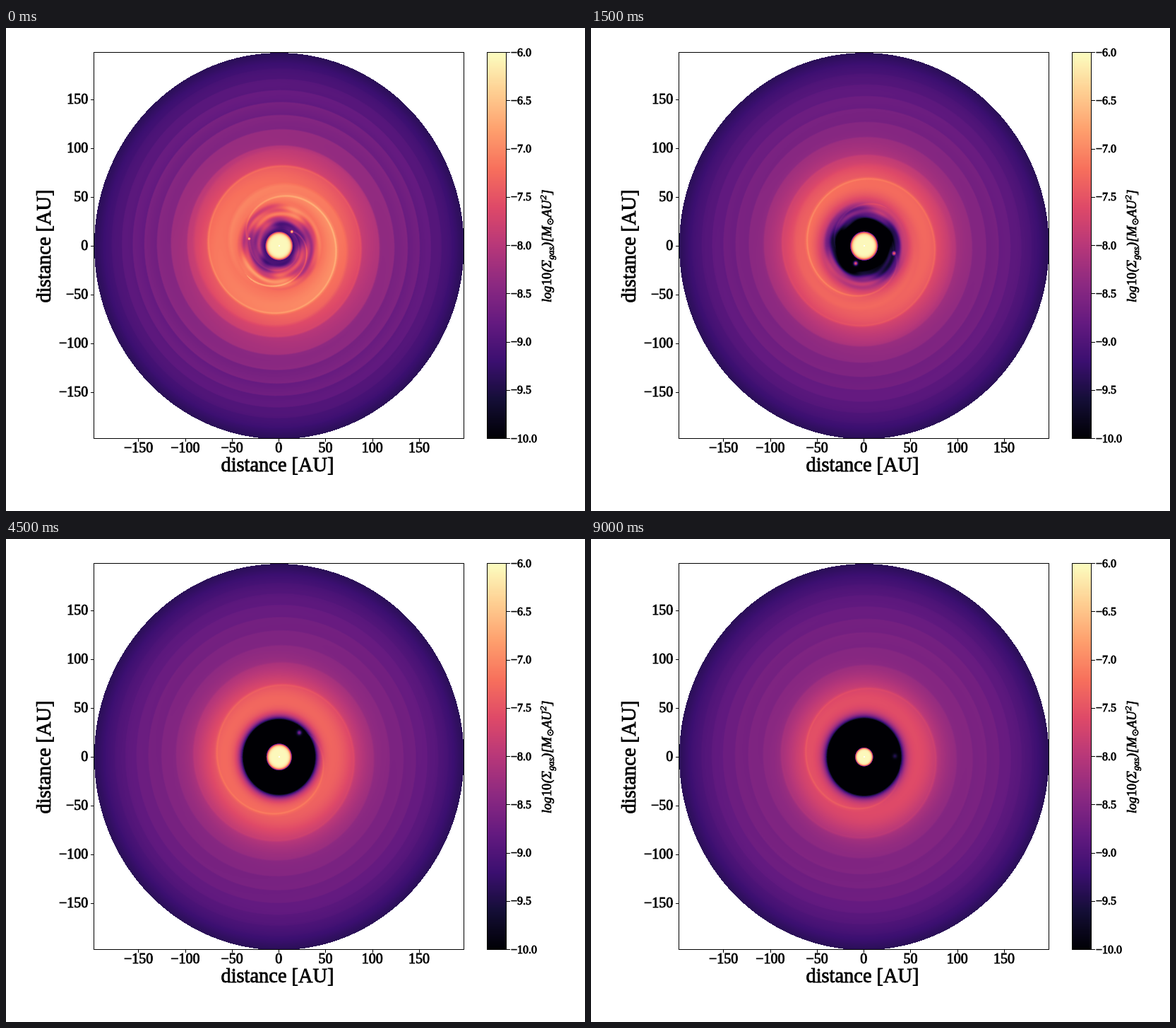
Animation, 820 px wide and 683 px high, one loop 9.5 s. Source, as an HTML page with a canvas:

```html
<!DOCTYPE html>
<html>
<head>
<meta charset="utf-8">
<style>
html, body { margin: 0; width: 100%; height: 100%; overflow: hidden; background: #fff; }
canvas { display: block; }
</style>
</head>
<body>
<canvas id="stage" width="820" height="683"></canvas>
<script>
const ctx = document.getElementById('stage').getContext('2d');
const TAU = Math.PI * 2, STEP = 500, STEPS = 19;
const PLOT = { x: 125, y: 35, w: 523, h: 545, cx: 386.3, cy: 307.7, sx: 1.3225, sy: 1.379 };
const RMAX = 198, RES = 8, ORBIT = 33, INNER = 20;

const { exp, pow, min, max, sin, cos, abs } = Math;
const clamp = (v, a = 0, b = 1) => max(a, min(b, v));
const fract = v => v - Math.floor(v);
const rad = d => d * Math.PI / 180;

// magma colour map
const STOPS = ['000004', '140e36', '3b0f70', '641a80', '8c2981', 'b73779',
  'de4968', 'f7705c', 'fe9f6d', 'fecf92', 'fcfdbf']
  .map(s => [0, 2, 4].map(i => parseInt(s.substr(i, 2), 16)));
const MAP = Array.from({ length: 512 }, (_, i) => {
  const p = i / 511 * 10, n = min(9, Math.floor(p));
  return STOPS[n].map((c, k) => c + (STOPS[n + 1][k] - c) * (p - n));
});

// smooth density: falling disc, warm ring, and a gap that deepens with time
function density(r, s) {
  const disc = .365 - .21 * pow(max(0, r - 100) / 98, 2);
  const ring = (.385 - .0075 * s) * exp(-pow((r - 55) / (42 - .6 * s), 2));
  const depth = .5 + .2 * s;
  const width = 3.6 + 7 * clamp((5.5 - s) / 2);
  const edge = .5 * (1 - exp(-(s + .4) / 4)) * exp((40 - r) / width);
  return disc + ring - depth * (1 - exp(-edge / depth));
}

// turns by which each wake trails its planet
function outerLag(r) {
  const x = r - ORBIT;
  return x > 0 ? .00155 * pow(x, 1.715) : -.0128 * pow(-x, 1.5);
}
const innerLag = r => .0101 * pow(max(0, r - INNER), 1.2);

const outerAngle = s => rad(s <= 7 ? 167 - 60.1 * s : 106 * exp((7 - s) / 2.6));
const innerAngle = s => rad(47 + 6.3 * s + 19.7 * s * s);

const sample = f => Float32Array.from({ length: RMAX * RES + 2 }, (_, i) => f(i / RES));
const slope = f => sample(r => max(.01, f(r + .5) - f(r - .5)));
const lag1 = sample(outerLag), slope1 = slope(outerLag);
const lag2 = sample(innerLag), slope2 = slope(innerLag);

// rises outward, then drops at the shock front
const saw = f => (f < .1 ? 1 - f / .1 : (f - .1) / .9) - .5;
const ridge = (f, slope, w) => exp(-pow(min(f, 1 - f) / slope / w, 2));

function planet(angle, r, amp, size) {
  const x = r * cos(angle), y = r * sin(angle);
  return (px, py) => amp * exp(-((px - x) ** 2 + (py - y) ** 2) / (2 * size * size));
}

function render(s) {
  const img = ctx.createImageData(PLOT.w, PLOT.h), data = img.data;
  const p1 = outerAngle(s), p2 = innerAngle(s);
  const rc = 15.2 - .0165 * s * s;
  const step1 = .026 + .03 * exp(-s / 3), line1 = .03 + .04 * exp(-s / 5);
  const early = clamp(1 - s / 5), swirl = .13 * clamp((6 - s) / 3);
  const blob1 = planet(p1, ORBIT, .9 * exp(-s / 10), 1.6);
  const blob2 = planet(p2, INNER, .95 * clamp((4 - s) * .7), 1.4);

  const base = sample(r => density(r, s));
  const bands1 = sample(r => step1 * clamp((r - 45) / 15) * clamp((190 - r) / 45));
  const bands2 = sample(r => .04 * early * clamp((r - 40) / 15) * clamp((120 - r) / 40));
  const lines = sample(r => clamp((95 - r) / 35) * clamp((r - 17) / 3));
  const mix = sample(r => swirl * clamp((r - 16) / 5) * clamp((46 - r) / 8));

  for (let j = 0, o = 0; j < PLOT.h; j++) {
    const y = (PLOT.cy - PLOT.y - j) / PLOT.sy;
    for (let i = 0; i < PLOT.w; i++, o += 4) {
      const x = (i + PLOT.x - PLOT.cx) / PLOT.sx, r = Math.hypot(x, y);
      data[o + 3] = 255;
      if (r > RMAX || r < .9) {
        data[o] = data[o + 1] = data[o + 2] = 255;
        continue;
      }
      const k = Math.round(r * RES);
      let v = base[k];
      if (r < rc) {
        v = max(r > rc * .95 ? v : 0, .99 - .9 * pow(r / rc, 10));
      } else {
        const th = Math.atan2(y, x);
        const f1 = fract(lag1[k] - (p1 - th) / TAU);
        v += bands1[k] * saw(f1);
        if (lines[k]) v += lines[k] * line1 * ridge(f1, slope1[k], 1);
        if (early) {
          const f2 = fract(lag2[k] - (p2 - th) / TAU);
          v += bands2[k] * saw(f2);
          if (r < 46) v += lines[k] * .12 * early * ridge(f2, slope2[k], .9);
        }
        if (mix[k]) {
          const a = th + .09 * r - p1;
          v += mix[k] * (cos(2 * a - 3.3 + .8 * sin(3 * th - .25 * r))
            + .25 * sin(.95 * r + 3 * th - p1));
        }
        if (r < 42) v = max(v, blob1(x, y), blob2(x, y));
      }
      const c = MAP[Math.round(clamp(v) * 511)];
      data[o] = c[0];
      data[o + 1] = c[1];
      data[o + 2] = c[2];
    }
  }
  return img;
}

const SERIF = '"Liberation Serif", "DejaVu Sans", serif';

function label(str, x, y, size, align, weight = .8, style = '') {
  ctx.font = `${style} ${size}px ${SERIF}`;
  ctx.textAlign = align;
  ctx.lineWidth = weight;
  ctx.fillText(str, x, y);
  ctx.strokeText(str, x, y);
  return ctx.measureText(str).width;
}

function turned(x, y, draw) {
  ctx.save();
  ctx.translate(x, y);
  ctx.rotate(-Math.PI / 2);
  draw();
  ctx.restore();
}

function barTitle() {
  let x = 0;
  const put = (str, size = 18.3, dy = 0, style = 'italic') => {
    x += label(str, x, dy, size, 'left', .7, style) + .6;
  };
  put('log');
  put('10', 18.3, 0, '');
  put('(Σ');
  put('gas', 13, 4);
  put(')[');
  put('M');
  put('⊙', 13, 3, '');
  put('AU');
  put('2', 13, -7);
  put(']');
}

const minus = s => s.replace('-', '\u2212');

function furniture() {
  ctx.fillStyle = '#fff';
  ctx.fillRect(0, 0, 820, 683);
  ctx.fillStyle = ctx.strokeStyle = '#000';
  for (let v = -150; v <= 150; v += 50) {
    const x = 386 + v * 1.325, y = 308 - v * 1.38, str = minus(String(v));
    ctx.fillRect(Math.round(x), 581, 1, 4);
    ctx.fillRect(120, Math.round(y), 4, 1);
    label(str, x + .3, 600, 20, 'center');
    label(str, 116.3, y + 6, 20, 'right');
  }
  label('distance [AU]', 384.5, 627, 28.4, 'center');
  turned(63, 308.5, () => label('distance [AU]', 0, 0, 28.4, 'center'));

  for (let y = 35; y < 580; y++) {
    const c = MAP[Math.round((580 - y) / 545 * 511)];
    ctx.fillStyle = `rgb(${c.map(Math.round)})`;
    ctx.fillRect(681, y, 28, 1);
  }
  ctx.fillStyle = '#000';
  ctx.lineWidth = 1;
  ctx.strokeRect(681.5, 34.5, 27, 546);
  for (let i = 0; i <= 8; i++) {
    const y = 34.5 + i * 68.25;
    ctx.fillRect(709, Math.round(y - .5), 5, 1);
    label(minus((-6 - i / 2).toFixed(1)), 715, y + 5, 16, 'left');
  }
  turned(772, 388, barTitle);
}

const cache = [];
let shown = -1;

function show(s) {
  cache[s] = cache[s] || render(s);
  ctx.putImageData(cache[s], PLOT.x, PLOT.y);
  ctx.strokeStyle = '#000';
  ctx.lineWidth = 1;
  ctx.strokeRect(124.5, 34.5, 524, 546);
  shown = s;
}

const start = performance.now();

function tick() {
  const s = Math.floor(max(0, performance.now() - start) / STEP) % STEPS;
  if (s !== shown) show(s);
  requestAnimationFrame(tick);
}

furniture();
show(0);
tick();
</script>
</body>
</html>
```
